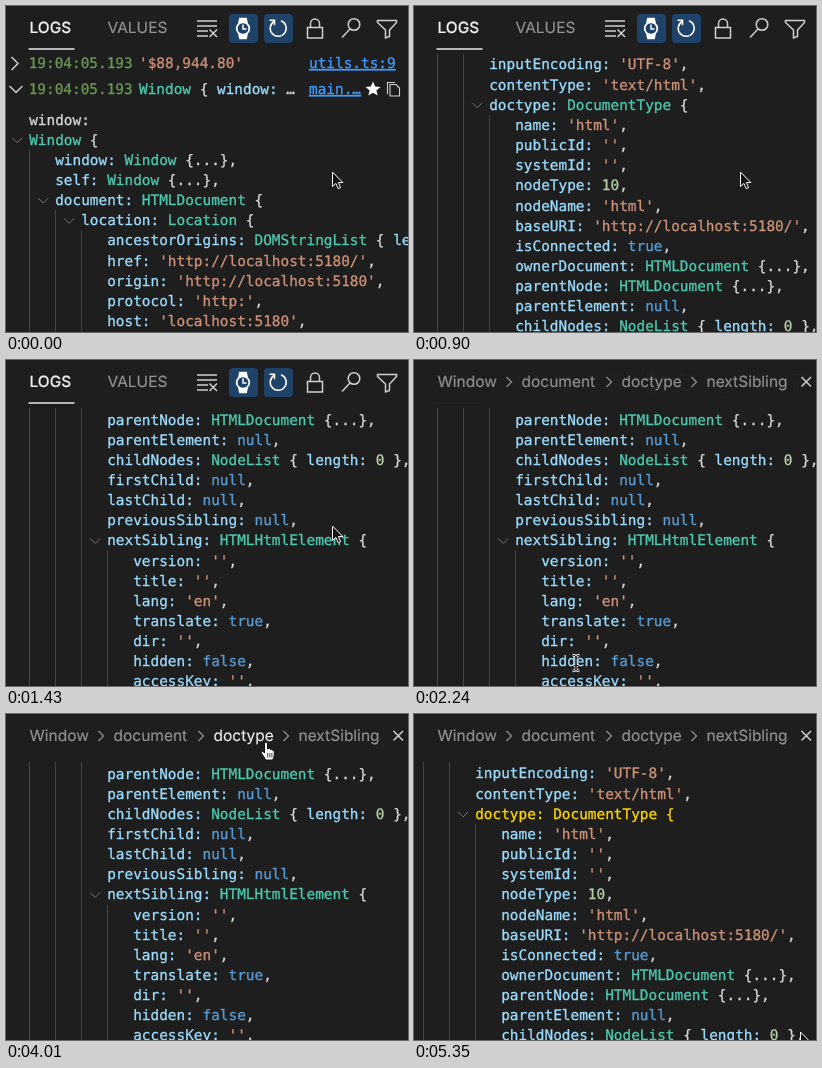
These frames come from a looping animation (402x326 px, 5380 ms). An HTML page:

```html
<!DOCTYPE html>
<html lang="en">
<head>
<meta charset="utf-8">
<title>Log viewer</title>
<style>
  html, body { margin: 0; width: 100%; height: 100%; overflow: hidden; background: #1e1e1e; }
  svg { display: block; width: 402px; height: 326px; }
  text { white-space: pre; text-rendering: geometricPrecision; }
  text, tspan { fill: currentColor; stroke: currentColor; stroke-width: .3; }
  #log text { font: 14.4px "DejaVu Sans Mono", monospace; color: #d8d8d8; }
  #toolbar text, #crumbs text { font: 15.5px Inter, sans-serif; color: #939393; stroke-width: .15; }
  #log .time { color: #6a9955; }
  #log .string { color: #ce9178; }
  #log .key { color: #9cdcfe; }
  #log .word { color: #569cd6; }
  #log .number { color: #b5cea8; }
  #log .type { color: #4ec9b0; }
  #log .plain * { color: #d8d8d8; }
  #log .marked, #log .marked * { color: #ffd700; }
  #log .link { color: #3f9bff; text-decoration: underline; }
  #toolbar .active, #crumbs .hover { color: #f0f0f0; }
  #toolbar .active { font-weight: 500; }
  .icon { fill: none; stroke: #cfcfcf; stroke-width: 1.5; }
  .on { stroke: #fff; }
  .fold { fill: none; stroke: #757575; stroke-width: 1; }
  .guide { stroke: #454545; stroke-width: 1; }
</style>
</head>
<body>
<svg viewBox="0 0 402 326">
  <g id="log">
    <path class="icon" d="M5.5 51l6.5 6.500-6.500 6.500M3.500 80l6.500 6.500 6.500-6.500"/>
    <text class="link" x="303" y="62">utils.ts:9</text>
    <text class="link" x="303" y="88">main.…</text>
    <path fill="#fff" d="M367 75.500l2.100 5 5.400.4-4.100 3.500 1.300 5.200-4.700-2.800-4.700 2.800 1.300-5.200-4.100-3.500 5.400-.4z"/>
    <path class="icon" style="stroke-width: 1.1" d="M384 78.500h6l3.500 3.500v8h-9.500zM381.500 88v-11.500h7.500"/>
  </g>

  <rect width="402" height="48" fill="#1e1e1e"/>

  <g id="toolbar">
    <text class="active" x="23.5" y="26.8">LOGS</text>
    <text x="101.5" y="26.8">VALUES</text>
    <path d="M22.5 43h46" stroke="#e7e7e7" stroke-width="1.3"/>
    <path class="icon" d="M191 15h20M191 20h20M191 25h11M191 30h11M203.5 23.500l7.500 7.500m0-7.500l-7.500 7.500"/>
    <rect x="223" y="8" width="29" height="29" rx="4" fill="#1e4268"/>
    <rect x="258" y="8" width="29" height="29" rx="4" fill="#1e4268"/>
    <g class="icon on">
      <circle cx="237" cy="22.5" r="6.3" stroke-width="1.8"/>
      <path d="M233 16.500l.8-4h6.400l.8 4zM233 28.500l.8 4h6.400l.8-4z" fill="#fff"/>
      <path d="M237 18.500v4.500h3.500"/>
      <path d="M263.5 14.300h5v5M268 15.500a8 8 0 1 0 7-.7"/>
    </g>
    <path class="icon" d="M301.5 21.500h15v10.500h-15zM304.5 21.500v-4a4.500 4.500 0 0 1 9 0v4"/>
    <g class="icon"><circle cx="348" cy="18.500" r="5.800"/><path d="M344 23l-8 8.500"/></g>
    <path class="icon" d="M371.5 14.500h19v2l-7 7.500v6.500l-4 1.500v-8l-8-7.500z"/>
  </g>

  <g id="crumbs">
    <path class="icon" d="M387.5 17l9.500 9.500m0-9.500l-9.500 9.500"/>
  </g>

  <path id="arrow" d="M-.5 0V14.500L2.900 11.400 5.200 16.700 7.600 15.700 5.400 10.500H9.800Z" fill="#111" stroke="#fff"/>
  <g id="beam" fill="none">
    <path d="M-3.500-8Q0-8 0-5V5Q0 8-3.500 8M3.500-8Q0-8 0-5V5Q0 8 3.500 8M-2 2.500H2" stroke="#fff" stroke-width="2.6"/>
    <path d="M-3.500-8Q0-8 0-5V5Q0 8-3.500 8M3.500-8Q0-8 0-5V5Q0 8 3.500 8M-2 2.500H2" stroke="#111"/>
  </g>
  <g id="hand">
    <path d="M-1.500 9V1Q-1.500-1 0-1T1.500 1V6Q3.500 4.500 4.300 6.500 6 5.500 6.500 7.300 8.300 6.500 8.300 9V12Q8 14.500 6.700 17H-.5Q-1.500 14-4.500 10.500-5.500 8.500-4 8.300-2.500 8-1.500 10Z" fill="#fff" stroke="#111"/>
    <path d="M1.700 10v4.500M3.800 10v4.500M5.900 10v4.500" stroke="#111" stroke-width=".8"/>
  </g>
</svg>

<script>
const LOOP = 5380, LEFT = 23.2, INDENT = 26, FIRST = 118.5, ROW = 20.15;

// One leading space per tree level.
const tree = `window:
Window {
 window: Window {...},
 self: Window {...},
 document: HTMLDocument {
  location: Location {
   ancestorOrigins: DOMStringList { length: 0 },
   href: 'http://localhost:5180/',
   origin: 'http://localhost:5180',
   protocol: 'http:',
   host: 'localhost:5180',
   hostname: 'localhost',
   port: '5180',
   pathname: '/',
   search: '',
   hash: '',
   Symbol(Symbol.toPrimitive): undefined
  },
  implementation: DOMImplementation {},
  URL: 'http://localhost:5180/',
  documentURI: 'http://localhost:5180/',
  compatMode: 'CSS1Compat',
  characterSet: 'UTF-8',
  charset: 'UTF-8',
  inputEncoding: 'UTF-8',
  contentType: 'text/html',
  doctype: DocumentType {
   name: 'html',
   publicId: '',
   systemId: '',
   nodeType: 10,
   nodeName: 'html',
   baseURI: 'http://localhost:5180/',
   isConnected: true,
   ownerDocument: HTMLDocument {...},
   parentNode: HTMLDocument {...},
   parentElement: null,
   childNodes: NodeList { length: 0 },
   firstChild: null,
   lastChild: null,
   previousSibling: null,
   nextSibling: HTMLHtmlElement {
    version: '',
    title: '',
    lang: 'en',
    translate: true,
    dir: '',
    hidden: false,
    accessKey: '',`.split('\n');

const $ = id => document.getElementById(id);

function add(parent, tag, attrs, text = '') {
  const node = document.createElementNS('http://www.w3.org/2000/svg', tag);
  for (const name in attrs) node.setAttribute(name, attrs[name]);
  node.textContent = text;
  return parent.appendChild(node);
}

const token = /(?<time>\d\d:\d\d:[\d.]+)|(?<string>'[^']*')|(?<key>[\w().]+:)|(?<word>\b(?:true|false|null|undefined)\b)|(?<number>\b\d+\b)|(?<type>\b[A-Z]\w+)/g;

function addCode(x, y, code, name = '') {
  const line = add($('log'), 'text', { x, y, class: name });
  let end = 0;
  for (const match of code.matchAll(token)) {
    line.append(code.slice(end, match.index));
    const kind = Object.keys(match.groups).find(key => match.groups[key]);
    add(line, 'tspan', { class: kind }, match[0]);
    end = match.index + match[0].length;
  }
  line.append(code.slice(end));
  return line;
}

function addEntry(y, value) {
  addCode(LEFT - .5, y, '19:04:05.193');
  addCode(133, y, value);
}
addEntry(62, "'$88,944.80'");
addEntry(88, 'Window { window: …');

const levels = tree.map(line => line.search(/\S/));
let doctypeLine;
tree.forEach((line, i) => {
  const x = LEFT + levels[i] * INDENT, y = FIRST + i * ROW;
  const node = addCode(x, y, line.trim(), i ? '' : 'plain');
  if (line.startsWith('  doctype')) doctypeLine = node;
  if (!line.endsWith('{')) return;
  const close = levels.findIndex((level, j) => j > i && level <= levels[i]);
  const bottom = FIRST + (close < 0 ? tree.length : close) * ROW - 15;
  add($('log'), 'path', { class: 'fold', d: `M${x - 17} ${y - 7}l5 5 5-5` });
  add($('log'), 'path', { class: 'guide', d: `M${Math.floor(x) + .5} ${y + 5}V${bottom}` });
});

const crumbs = [['Window', 23.5], ['document', 107.5], ['doctype', 207.5], ['nextSibling', 292.5]]
  .map(([name, x], i) => {
    if (i) add($('crumbs'), 'path', { d: `M${x - 15} 17l5 5-5 5`, fill: 'none', stroke: '#939393', 'stroke-width': 1.2 });
    return add($('crumbs'), 'text', { x, y: 26.8 }, name);
  });

// Keys are [time, value, slope]; cubic Hermite between them.
function track(keys, t) {
  const next = keys.findIndex(key => key[0] > t);
  if (next === 0) return keys[0][1];
  if (next < 0) return keys.at(-1)[1];
  const [t0, a, va = 0] = keys[next - 1], [t1, b, vb = 0] = keys[next];
  const span = t1 - t0, u = (t - t0) / span, w = 1 - u;
  return a + (b - a) * u * u * (3 - 2 * u) + span * u * w * (va * w - vb * u);
}

const scrollY = [[440, 0, .6], [620, 236.4, 1.35], [900, 537.6, 1], [1110, 734.6, .22],
  [1430, 759.2], [4510, 759.2], [4880, 537.6]];
const scrollX = [[4510, 0], [4880, 14]];
const fade = [[2130, 0], [2250, 1]];

// [time, x, y, x slope, y slope]
const pointer = [[1520, 327, 166], [1640, 162, 303], [2260, 162, 303], [2690, 238, 105, .25, -.3],
  [3080, 332, 36], [3230, 332, 36], [3350, 337, 31], [3620, 337, 31], [4010, 260, 29],
  [4700, 260, 29], [5030, 166, 97], [5100, 166, 97], [5350, 387, 318]];
const pointerX = pointer.map(([t, x, , vx]) => [t, x, vx]);
const pointerY = pointer.map(([t, , y, , vy]) => [t, y, vy]);

function draw(t) {
  const during = (from, to) => t >= from && t < to;
  $('log').setAttribute('transform', `translate(${-track(scrollX, t)} ${-track(scrollY, t)})`);
  doctypeLine.classList.toggle('marked', t >= 4520);

  const shown = track(fade, t);
  $('toolbar').setAttribute('opacity', 1 - shown);
  $('crumbs').setAttribute('opacity', shown);
  crumbs[2].classList.toggle('hover', during(3930, 4760));
  crumbs[3].classList.toggle('hover', during(3650, 3830));

  const shape = during(1850, 2400) ? 'beam' : during(3290, 4760) ? 'hand' : 'arrow';
  for (const id of ['arrow', 'beam', 'hand']) {
    $(id).setAttribute('visibility', id === shape ? 'visible' : 'hidden');
    $(id).setAttribute('transform', `translate(${track(pointerX, t)} ${track(pointerY, t)})`);
  }
}

const start = performance.now();
function frame() {
  draw((performance.now() - start) % LOOP);
  requestAnimationFrame(frame);
}
frame();
</script>
</body>
</html>
```
